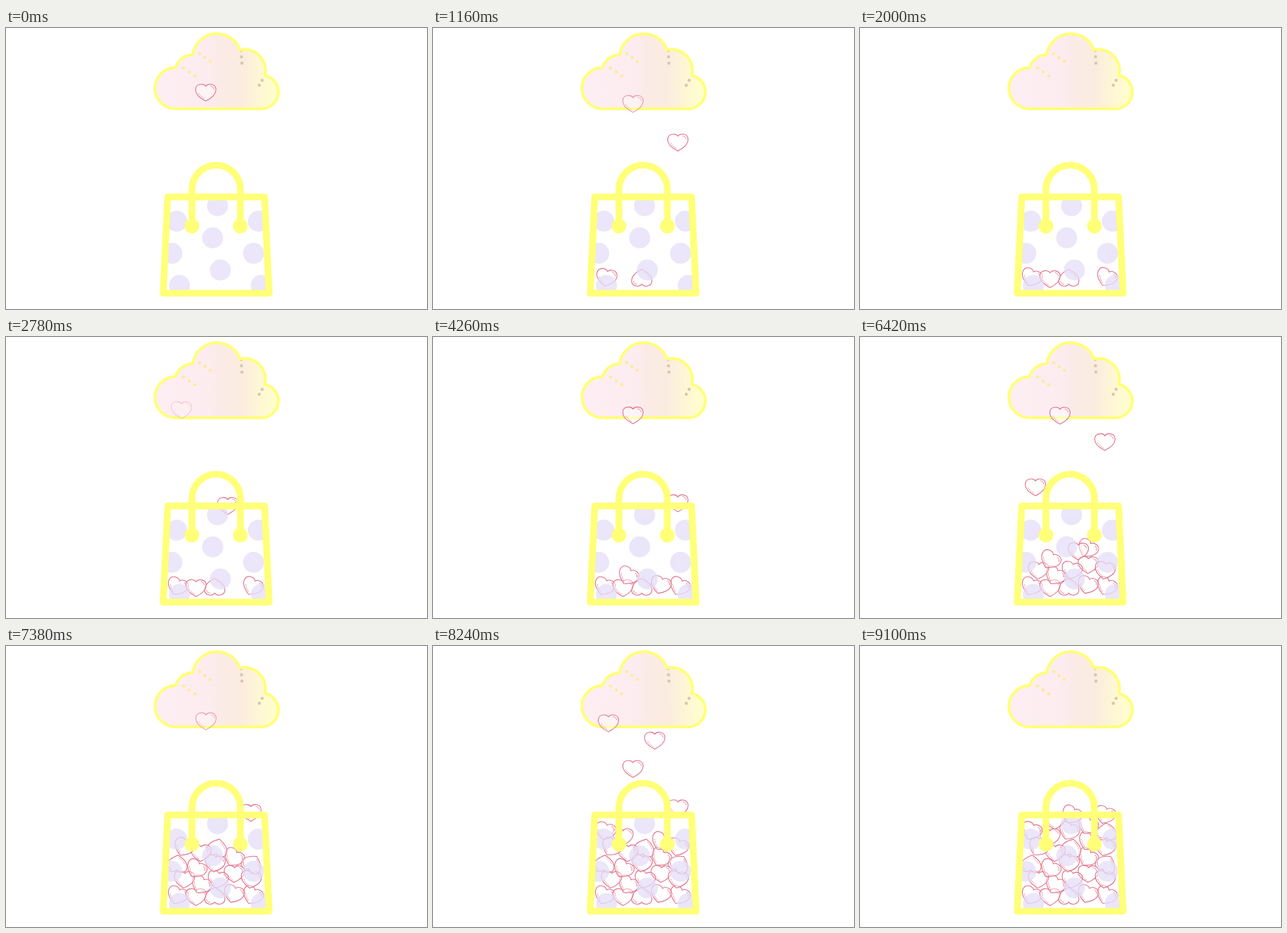
These frames come from a looping animation (600 px wide and 400 px high, 9120 ms). An HTML page:

```html
<!DOCTYPE html>
<html lang="en">
<head>
<meta charset="utf-8">
<title>Hearts falling into a bag</title>
<style>
  html, body { margin: 0; width: 100%; height: 100%; overflow: hidden; background: #fff; }
  svg { display: block; width: 100vw; height: 100vh; }
  .line { fill: none; stroke: #ffff78; stroke-linecap: round; stroke-linejoin: round; }
</style>
</head>
<body>
<svg viewBox="0 0 600 400">
  <defs>
    <linearGradient id="sky">
      <stop offset="0" stop-color="#fdeef3"/>
      <stop offset=".44" stop-color="#fcecf0"/>
      <stop offset=".5" stop-color="#fbebe8"/>
      <stop offset=".7" stop-color="#fbece0"/>
      <stop offset=".88" stop-color="#fff9d2"/>
      <stop offset="1" stop-color="#ffffce"/>
    </linearGradient>
    <path id="cloud" d="M241.5 115A29.25 29.25 0 0 1 241.5 56.5A26 26 0 0 1 266 38A35 35 0 0 1 333.5 31.2A30 30 0 0 1 369 67.5A24 24 0 0 1 364 115Z"/>
    <clipPath id="inside"><path d="M230 240H369L375 378H224Z"/></clipPath>
    <g id="heart" fill="none" stroke="#e0708a" stroke-width="1.1" stroke-linecap="round">
      <path fill="#fff" fill-opacity=".45" d="M0-9C3-13.5 14.5-13.5 14.5-4C14.5 3 6 9 0 12C-6 9-14.5 3-14.5-4C-14.5-13.5-3-13.5 0-9Z"/>
      <path stroke-width=".9" stroke-dasharray=".8 1.7" d="M-10 1Q-7 6-1 9"/>
      <path stroke-width=".8" d="M7-9.3Q11-9 11.8-5"/>
    </g>
  </defs>

  <use href="#cloud" fill="url(#sky)"/>
  <g id="specks"></g>
  <use href="#cloud" class="line" stroke-width="4"/>

  <g id="hearts"></g>
  <g id="dots" clip-path="url(#inside)" opacity=".75"></g>

  <g class="line" stroke-width="9.6">
    <path d="M230.5 240.5H368.5L375 377.5H224Z"/>
    <path d="M265 282V229.8A34.5 34.5 0 0 1 334 229.8V282"/>
  </g>
  <g fill="#ffff78"><circle cx="265" cy="282" r="10.5"/><circle cx="334" cy="282" r="10.5"/></g>
</svg>
<script>
  const LOOP = 9120, GRAVITY = 406e-6, TOP = 101;
  const columns = [250, 349, 285, 316];

  // Each digit picks one of five stacks; a heart lands on top of its stack.
  const order = "2041313230412042104130423142";
  const upsideDown = [0, 13, 14, 15, 22];

  // Pace of the rain: heart index and the time it is let go
  const pace = [[0, 80], [1, 350], [2, 770], [3, 1029], [4, 2195], [5, 2694],
    [6, 3683], [10, 5349], [18, 6801], [19, 7258], [27, 8370]];

  const byId = id => document.getElementById(id);
  const clamp = v => Math.min(1, Math.max(0, v));
  const ease = v => { const k = clamp(v); return k * k * (3 - 2 * k); };
  const mix = (a, b, k) => a + (b - a) * k;

  function add(parent, tag, attrs) {
    const node = document.createElementNS(parent.namespaceURI, tag);
    for (const name in attrs) node.setAttribute(name, attrs[name]);
    return parent.appendChild(node);
  }

  function speckRow(fill, x, y, dx, dy, count) {
    for (let k = 0; k < count; k++)
      add(byId("specks"), "circle", { cx: x + dx * k, cy: y + dy * k, r: 2.3, fill });
  }

  speckRow("#fbeb9c", 253, 57, 8, 5.5, 3);
  speckRow("#fbeb9c", 276, 36.5, 7.5, 5.5, 3);
  speckRow("#d6c9b0", 335, 32, 0.6, 9, 3);
  speckRow("#d6c9b0", 365, 74.5, -4, 7, 2);

  [301.5, 294.5, 305.5].forEach((middle, row) => {
    for (const side of [-1, 0, 1])
      add(byId("dots"), "circle", {
        cx: middle + 58.3 * side,
        cy: 253 + 45.75 * row + 22 * Math.abs(side),
        r: 15, fill: "#e4def7"
      });
  });

  function startOf(n) {
    const next = Math.max(1, pace.findIndex(([index]) => index >= n));
    const [[n0, t0], [n1, t1]] = pace.slice(next - 1, next + 1);
    return mix(t0, t1, (n - n0) / (n1 - n0));
  }

  const heights = [0, 0, 0, 0, 0];

  function makeHeart(digit, n) {
    const row = heights[digit]++;
    const across = digit / 4;
    const [left, right] = row % 2 ? [254, 349] : [244, 351];
    const sway = (row ? 8 : 2) * Math.sin(2 * Math.PI * across);
    const restY = 355.5 - 22.9 * row + sway;
    const from = n ? TOP : 92;
    return {
      node: add(byId("hearts"), "use", { href: "#heart" }),
      start: startOf(n),
      column: n ? columns[(n - 1) % 4] : 284.7,
      from,
      fall: Math.sqrt((restY - from) / GRAVITY),
      restX: mix(left, right, across),
      restY,
      turn: 16 - 16 * Math.cos(2 * n) + (upsideDown.includes(n) ? 180 : 0),
      fades: n > 0
    };
  }

  const hearts = [...order].map((digit, n) => makeHeart(+digit, n));

  function drawHeart(h, t) {
    const age = Math.max(0, t - h.start);
    const roll = ease((age - h.fall * 0.88) / (h.fall * 0.12 + 140));
    const x = mix(h.column, h.restX, roll);
    const y = Math.min(h.restY, h.from + GRAVITY * age * age);
    h.node.setAttribute("transform", `translate(${x} ${y}) rotate(${h.turn * roll})`);
    h.node.setAttribute("opacity", h.fades ? clamp((y - TOP) / 10) : 1);
  }

  const begin = performance.now();
  function tick() {
    const t = (performance.now() - begin) % LOOP;
    for (const heart of hearts) drawHeart(heart, t);
    requestAnimationFrame(tick);
  }
  tick();
</script>
</body>
</html>
```
